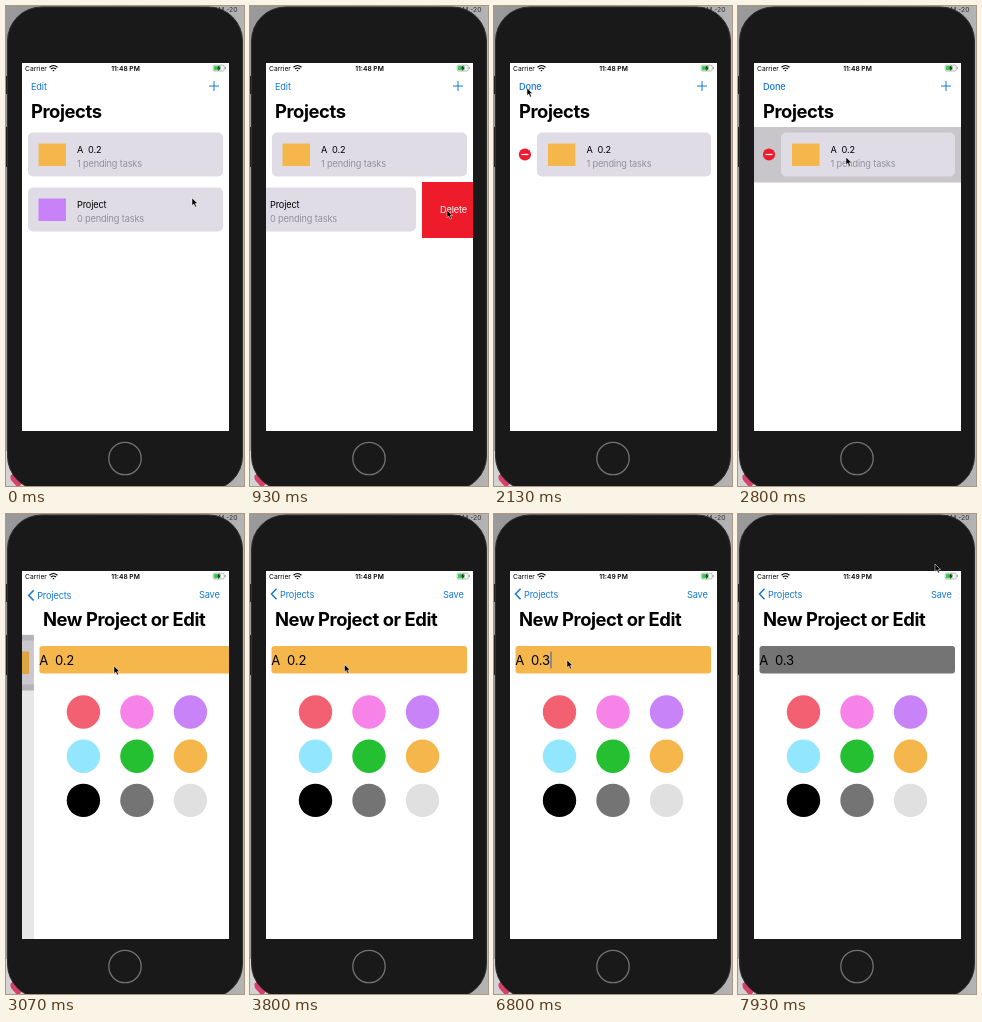
Animation, 238 px wide and 480 px high, one loop 8 s. Source, as an HTML page:

```html
<!DOCTYPE html>
<html lang="en">
<head>
<meta charset="utf-8">
<title>Projects</title>
<style>
  html, body { margin: 0; width: 100%; height: 100%; overflow: hidden; background: #aaa; }
  svg { display: block; width: 100vw; height: 100vh; }
  text { font-family: Inter, Roboto, sans-serif; font-size: 9.2px; letter-spacing: -.15px; white-space: pre; font-optical-sizing: none; }
  .title { font-size: 18.4px; font-weight: 700; letter-spacing: -.42px; }
  .blue { fill: #1478dc; }
  .hint { fill: #929197; }
  .status { font-size: 6.7px; letter-spacing: 0; }
  .input { font-size: 13.1px; letter-spacing: -.2px; }
  .line { fill: none; stroke: #1478dc; }
</style>
</head>
<body>
<svg viewBox="0 0 238 480" preserveAspectRatio="none">
  <defs>
    <linearGradient id="desk" x2="1" y2="0">
      <stop stop-color="#9a9a9a"/><stop offset=".5" stop-color="#8c8c8c"/><stop offset="1" stop-color="#b4b4b4"/>
    </linearGradient>
    <clipPath id="screen"><path d="M16 57H223V425H16Z"/></clipPath>
    <clipPath id="rowClip"><rect id="rowBox" x="16" y="176" width="207" height="56"/></clipPath>
  </defs>

  <rect width="238" height="480" fill="url(#desk)"/>
  <text class="status" x="205" y="6" fill="#333">1AM -20</text>
  <path d="M0 445H30V480H0Z" fill="#d5d2d4"/>
  <path d="M12 482l-7-8q-2-6 3-6 3 0 4 3 1-3 4-3 5 0 3 6Z" fill="#d8406c"/>
  <path d="M0 70h4v18H0ZM0 121h4v40H0Z" fill="#222"/>
  <rect x="1.5" y="1" width="235" height="483" rx="34" fill="#19191a" stroke="#303032"/>
  <circle cx="119" cy="452.5" r="16.2" fill="#19191a" stroke="#737373" stroke-width="1.3"/>

  <g clip-path="url(#screen)">
    <rect x="16" y="57" width="207" height="368" fill="#fff"/>

    <g id="list">
      <rect id="highlight" x="16" y="121" width="207" height="55.5" fill="#c8c6ca"/>
      <g id="minus">
        <circle cx="31" cy="148.5" r="6.1" fill="#ed1b2e"/>
        <path d="M27.5 148.5h7" stroke="#fff" stroke-width="1.2"/>
      </g>
      <rect id="firstCard" x="22" y="126.5" width="195" height="44" rx="5" fill="#dfdce6"/>
      <g id="firstBody">
        <path d="M32.5 137.5H60V160H32.5Z" fill="#f5b64c"/>
        <text x="71" y="147.3">A  0.2</text>
        <text class="hint" x="71" y="161.3">1 pending tasks</text>
      </g>
      <g id="second" clip-path="url(#rowClip)">
        <g id="secondBody">
          <rect x="22" y="181.5" width="195" height="44" rx="5" fill="#dfdce6"/>
          <path d="M32.5 192.5H60V215H32.5Z" fill="#c881f8"/>
          <text x="71" y="202.3">Project</text>
          <text class="hint" x="71" y="216.3">0 pending tasks</text>
        </g>
        <rect id="red" y="176" width="210" height="56" fill="#ee1c2a"/>
        <text id="delete" y="207.3" fill="#fff">Delete</text>
      </g>
      <path id="edges" fill="none" stroke="#dad7e2" stroke-width="1.3"/>
      <rect id="dim" x="16" y="57" width="290" height="368"/>
    </g>

    <g id="editor">
      <rect x="16" y="57" width="207" height="368" fill="#fff"/>
      <rect id="field" x="21.5" y="132" width="195.5" height="27.5" rx="3"/>
      <text id="value" class="input" x="21.3" y="150.8"></text>
      <path id="caret" d="M0 137.5V154.5" stroke="#4361c8" stroke-width="1.1"/>
      <g id="palette"></g>
    </g>

    <rect x="16" y="57" width="207" height="63.5" fill="#fff"/>
    <text id="listTitle" class="title" x="25" y="112">Projects</text>
    <text id="editorTitle" class="title" x="25" y="112">New Project or Edit</text>
    <g id="listNav">
      <text id="edit" class="blue" x="25" y="83.5"></text>
      <path class="line" d="M203 80h10M208 75v10"/>
    </g>
    <g id="editorNav">
      <g id="back">
        <path class="line" stroke-width="1.5" d="M26.5 74.8L21.5 80L26.5 85.2"/>
        <text class="blue" x="30" y="83.5">Projects</text>
      </g>
      <text class="blue" x="193" y="83.5">Save</text>
    </g>

    <text class="status" x="19" y="65">Carrier</text>
    <g fill="none" stroke="#000" stroke-width="1.2">
      <path d="M43.5 61.2q4-3.4 8 0M45 63q2.5-2 5 0"/>
      <path d="M46.8 64.6h1.4"/>
    </g>
    <text id="clock" class="status" x="119.5" y="65" text-anchor="middle" font-weight="600"></text>
    <rect x="207.2" y="59.2" width="11" height="5.8" rx="1.5" fill="#fff" stroke="#888" stroke-width=".6"/>
    <rect x="208" y="60" width="6.5" height="4.2" rx=".6" fill="#3ccb55"/>
    <path d="M213.4 59l-2.4 3.4h1.6l-.5 2.8 2.5-3.6h-1.7Z" fill="#222"/>
    <path d="M219.3 61v2" stroke="#888" stroke-width=".8"/>
  </g>

  <path id="cursor" d="M0 0V7.6L1.8 6 3.1 9 4.5 8.4 3.2 5.5H5.6Z" fill="#000" stroke="#fff" stroke-width=".5"/>
</svg>

<script>
const LOOP = 8000;
const ORANGE = '#f5b64c', GRAY = '#747474';
const el = Object.fromEntries([...document.querySelectorAll('[id]')].map(node => [node.id, node]));

const colors = ['#f26071', '#f583e8', '#c883f8', '#92e7ff', '#24c031', ORANGE, '#000', GRAY, '#e0e0e0'];
el.palette.innerHTML = colors.map((color, i) =>
  `<circle cx="${65.5 + i % 3 * 53.5}" cy="${198 + Math.floor(i / 3) * 44.2}" r="16.7" fill="${color}"/>`).join('');

// Pointer stops: time, x, y
const pointer = [
  [200, 186, 192], [530, 133, 195], [670, 137, 198], [930, 197, 204], [1130, 197, 204],
  [1400, 186, 187], [1860, 33, 82], [2270, 33, 82], [2720, 108, 151], [3070, 108, 152],
  [3400, 108, 152], [4330, 74, 148], [4470, 74, 148], [4600, 73, 146],
  [6800, 73, 146], [7400, 119, 284], [7660, 119, 284], [7930, 197, 50]
];

const clamp = v => Math.max(0, Math.min(1, v));
const mix = (a, b, p) => a + (b - a) * p;
const smooth = p => p * p * (3 - 2 * p);
const span = (t, start, end) => clamp((t - start) / (end - start));
const ease = (t, start, end) => smooth(span(t, start, end));
const move = (node, x, y = 0) => node.setAttribute('transform', `translate(${x} ${y})`);
const fade = (node, opacity) => node.setAttribute('opacity', opacity);
const attr = (node, name, value) => node.setAttribute(name, value);

function label(node, text) {
  if (node.textContent !== text) node.textContent = text;
}

function pointerAt(t) {
  const next = pointer.findIndex(stop => stop[0] > t);
  if (next === 0) return pointer[0].slice(1);
  if (next < 0) return pointer.at(-1).slice(1);
  const [a, b] = [pointer[next - 1], pointer[next]];
  const p = ease(t, a[0], b[0]);
  return [mix(a[1], b[1], p), mix(a[2], b[2], p)];
}

function drawDeletion(t) {
  const collapse = ease(t, 1130, 1580);
  const offset = mix(51 * ease(t, 220, 560), 207, collapse);
  const left = 223 - offset;
  const height = 56 * (1 - collapse);
  const collapsing = collapse > 0 && collapse < 1;
  fade(el.second, collapse < 1 ? 1 : 0);
  attr(el.rowBox, 'height', height);
  move(el.secondBody, -offset);
  fade(el.secondBody, 1 - clamp(collapse * 3));
  attr(el.red, 'x', left);
  attr(el.delete, 'x', left + 18);
  fade(el.delete, 1 - clamp(collapse * 4));
  fade(el.edges, collapsing ? 1 : 0);
  attr(el.edges, 'd', `M19 175.7H${left}M16 ${175.5 + height}H${Math.max(16, left - 20)}`);
}

function drawEditing(t) {
  const p = ease(t, 1900, 2140);
  move(el.minus, -20 * (1 - p));
  fade(el.minus, p);
  attr(el.firstCard, 'x', 22 + 21 * p);
  attr(el.firstCard, 'width', 195 - 21 * p);
  move(el.firstBody, 21.5 * p);
  fade(el.highlight, t >= 2735 ? 1 : 0);
  label(el.edit, t < 1930 ? 'Edit' : 'Done');
  attr(el.edit, 'font-weight', t < 1930 ? 400 : 500);
}

function drawPush(t) {
  const p = 1 - (1 - span(t, 2850, 3210)) ** 3;
  const shift = 207 * (1 - p);
  move(el.list, -62 * p);
  fade(el.dim, .1 * p);
  move(el.editor, shift);
  move(el.editorTitle, shift);
  move(el.listTitle, -62 * p);
  fade(el.listTitle, 1 - clamp(p * 1.6));
  fade(el.listNav, 1 - clamp(p * 1.6));
  fade(el.editorNav, clamp(p * 2 - .8));
  move(el.back, 20 * (1 - p), 24 * (1 - p));
}

function drawField(t) {
  const erased = t >= 5600 && t < 6270;
  label(el.value, t < 5600 ? 'A  0.2' : erased ? 'A  0.' : 'A  0.3');
  attr(el.field, 'fill', t < 7460 ? ORANGE : GRAY);
  move(el.caret, erased ? 48.5 : 57);
  fade(el.caret, span(t, 4440, 4480) - span(t, 4660, 4800) + span(t, 5110, 5200)
    - span(t, 6800, 6930) + span(t, 7130, 7250) - span(t, 7670, 7800));
}

function draw(t) {
  drawDeletion(t);
  drawEditing(t);
  drawPush(t);
  drawField(t);
  label(el.clock, t < 4000 ? '11:48 PM' : '11:49 PM');
  move(el.cursor, ...pointerAt(t));
  // The pointer hides while typing.
  fade(el.cursor, t >= 5600 && t < 6800 ? 0 : 1);
}

const start = performance.now();
function tick() {
  draw((performance.now() - start) % LOOP);
  requestAnimationFrame(tick);
}
tick();
</script>
</body>
</html>
```
